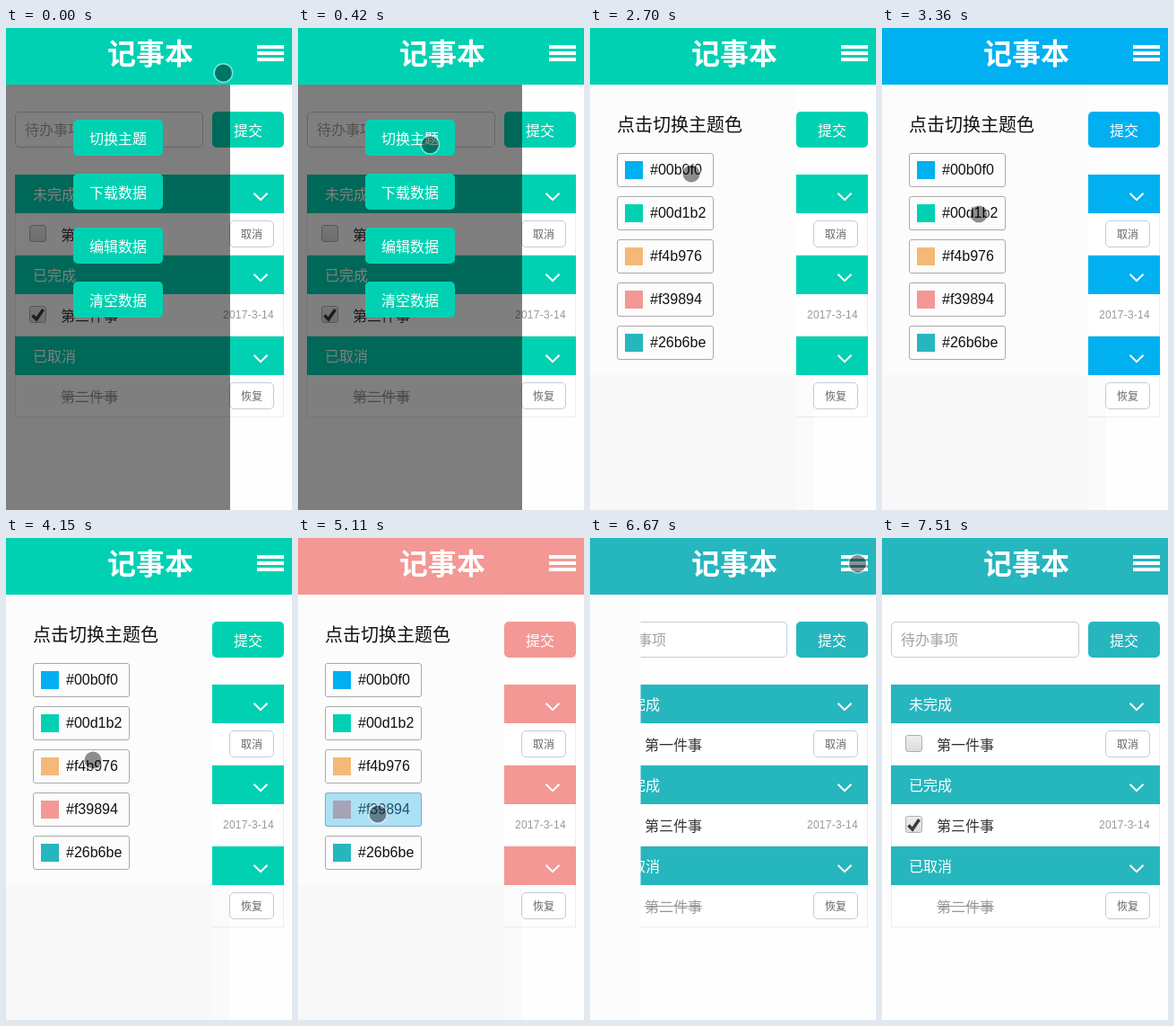
These frames come from a looping animation (319 px wide and 536 px high, 8 s). An HTML page:

```html
<!DOCTYPE html>
<html lang="zh-CN">
<head>
<meta charset="utf-8">
<title>记事本</title>
<style>
  html, body { margin: 0; width: 100%; height: 100%; overflow: hidden; background: #fefefe; }
  #stage { position: absolute; left: 0; top: 0; width: 319px; height: 536px; overflow: hidden;
    background: #fefefe; font-family: "Noto Sans CJK SC", "Noto Sans CJK", sans-serif; }
  #stage div { position: absolute; box-sizing: border-box; white-space: nowrap; }
  #stage svg { position: absolute; left: 0; top: 0; overflow: visible; }
  .theme { background: var(--theme); }
  .round { border-radius: 5px; }
  .line { border: 1px solid #c0ccda; background: #fff; }
  .row { border: 1px solid #ececec; border-top: 0; background: #fff; }
  .check { border: 1px solid #b0b0b0; border-radius: 3px; background: linear-gradient(#eee, #dcdcdc); }
  .choice { border: 1px solid #aaa; border-radius: 3px; }
  .tap { border-radius: 3px; background: #33b5e5; }
  .latin { font-family: "Liberation Sans", Arial, sans-serif; }
  .done { text-decoration: line-through 1px; }
  .cursor { border-radius: 50%; background: rgba(0,0,0,.44); box-shadow: 0 0 0 1.5px rgba(255,255,255,.48); }
</style>
</head>
<body>
<div id="stage"></div>
<script>
const stage = document.getElementById('stage');

function box(parent, x, y, w, h, cls = '', css = '') {
  const el = document.createElement('div');
  el.className = cls;
  el.style.cssText = `left:${x}px;top:${y}px;width:${w}px;height:${h}px;${css}`;
  parent.append(el);
  return el;
}

// Text starting at x, in a line box centred on cy.
function text(parent, x, cy, size, str, color, cls = '', css = '') {
  const el = document.createElement('div');
  el.className = cls;
  el.style.cssText = `left:${x}px;top:${cy - size}px;font-size:${size}px;` +
    `line-height:${size * 2}px;color:${color};${css}`;
  el.textContent = str;
  parent.append(el);
}

function path(parent, d, color, width) {
  parent.insertAdjacentHTML('beforeend',
    `<svg width="319" height="536"><path d="${d}" fill="none" stroke="${color}" stroke-width="${width}"/></svg>`);
}

function smallButton(cy, label) {
  box(stage, 249, cy - 15, 50, 30, 'line round');
  text(stage, 262, cy, 12, label, '#666');
}

// Note list
box(stage, 10, 93, 210, 40, 'line round');
text(stage, 21, 112, 16, '待办事项', '#a4a4a4', '', 'font-weight:300;');
box(stage, 230, 93, 80, 40, 'theme round');
text(stage, 254, 113, 16, '提交', '#fff');

['未完成', '已完成', '已取消'].forEach((title, i) => {
  const y = 163 + i * 90;
  box(stage, 10, y, 300, 43, 'theme');
  text(stage, 30, y + 21, 16, title, '#fff');
  path(stage, `M276.5 ${y + 20.7}l7.5 7.5l7.5 -7.5`, '#fff', 2);
  box(stage, 10, y + 43, 300, 47, 'row');
});
box(stage, 26, 219, 19, 19, 'check');
box(stage, 26, 309, 19, 19, 'check');
path(stage, 'M29.5 319.5l4.5 4.5l7.5 -11', '#3c3c3c', 3.6);
text(stage, 61, 229, 16, '第一件事', '#333');
text(stage, 61, 319, 16, '第三件事', '#333');
text(stage, 61, 409, 16, '第二件事', '#999', 'done');
smallButton(229, '取消');
smallButton(409, '恢复');
text(stage, 242, 319, 12, '2017-3-14', '#999', 'latin', 'letter-spacing:.25px;');

// Side menu
const menu = box(stage, 0, 63, 250, 473, '', 'background:rgba(0,0,0,.5);');
['切换主题', '下载数据', '编辑数据', '清空数据'].forEach((label, i) => {
  box(menu, 75, 39 + i * 60, 100, 40, 'theme round');
  text(menu, 93, 59 + i * 60, 16, label, '#fff');
});

// Theme panel
const colors = ['#00b0f0', '#00d1b2', '#f4b976', '#f39894', '#26b6be'];
const panel = box(stage, 0, 63, 230, 473, '', 'background:#fcfcfc;');
text(panel, 30, 44, 20, '点击切换主题色', '#111');
const taps = colors.map((color, i) => {
  const y = 76 + i * 48;
  box(panel, 30, y, 108, 38, 'choice');
  box(panel, 39, y + 9, 20, 20, '', `background:${color};`);
  text(panel, 67, y + 19, 16, color, '#111', 'latin');
  return box(panel, 30, y, 108, 38, 'tap');
});
const shade = box(stage, 0, 386, 250, 150, '', 'background:rgba(0,0,0,.016);');

// Title bar
box(stage, 0, 0, 319, 63, 'theme');
text(stage, 113, 26, 32, '记事本', '#fff', '', 'font-weight:700;');
for (let y = 19; y < 37; y += 7) box(stage, 280, y, 30, 4, '', 'background:#fff;');

const cursor = box(stage, -9.5, -9.5, 19, 19, 'cursor');

const period = 8000, opened = 1820, closed = 6600, lifted = 7510;
const tapTimes = [2850, 3790, 4610, 5110, 5770];   // one per colour, top to bottom

// Cursor moves: start, end, x, y
const moves = [
  [0, 500, 146.5, 129.5],
  [2330, 2700, 112.5, 161.5],
  [3160, 3360, 107.5, 206.5],
  [3910, 4150, 96.5, 246.5],
  [4730, 4990, 88.5, 306.5],
  [5250, 5500, 93, 352.5],
  [5917, 6520, 298, 28],
  [6900, 7450, 296.5, 533.5]
];

const clamp = v => Math.min(1, Math.max(0, v));
const ease = (t, from, to) => 1 - (1 - clamp((t - from) / (to - from))) ** 3;
const mix = (a, b, p) => a + (b - a) * p;

function cursorAt(t) {
  return moves.reduce(([x, y], [from, to, nextX, nextY]) => {
    const p = ease(t, from, to);
    return [mix(x, nextX, p), mix(y, nextY, p)];
  }, [242.5, 49]);
}

function draw(t) {
  const [x, y] = cursorAt(t);
  const open = t >= opened;
  const last = tapTimes.findLastIndex(time => time <= t);
  const slide = mix(-61, 0, ease(t, opened, 2090)) - 230 * ease(t, closed, 6790);

  stage.style.setProperty('--theme', colors[last < 0 ? 1 : last]);
  cursor.style.transform = `translate(${x}px, ${y}px)`;
  cursor.hidden = t >= lifted;
  menu.hidden = open;
  panel.hidden = !open;
  panel.style.transform = `translateX(${slide}px)`;
  shade.hidden = !open || t >= closed;
  taps.forEach((tap, i) => {
    tap.style.opacity = i === last ? 0.4 * clamp(1 - (t - tapTimes[i]) / 270) : 0;
  });
}

const start = performance.now();
function loop() {
  draw((performance.now() - start) % period);
  requestAnimationFrame(loop);
}
loop();
</script>
</body>
</html>
```
